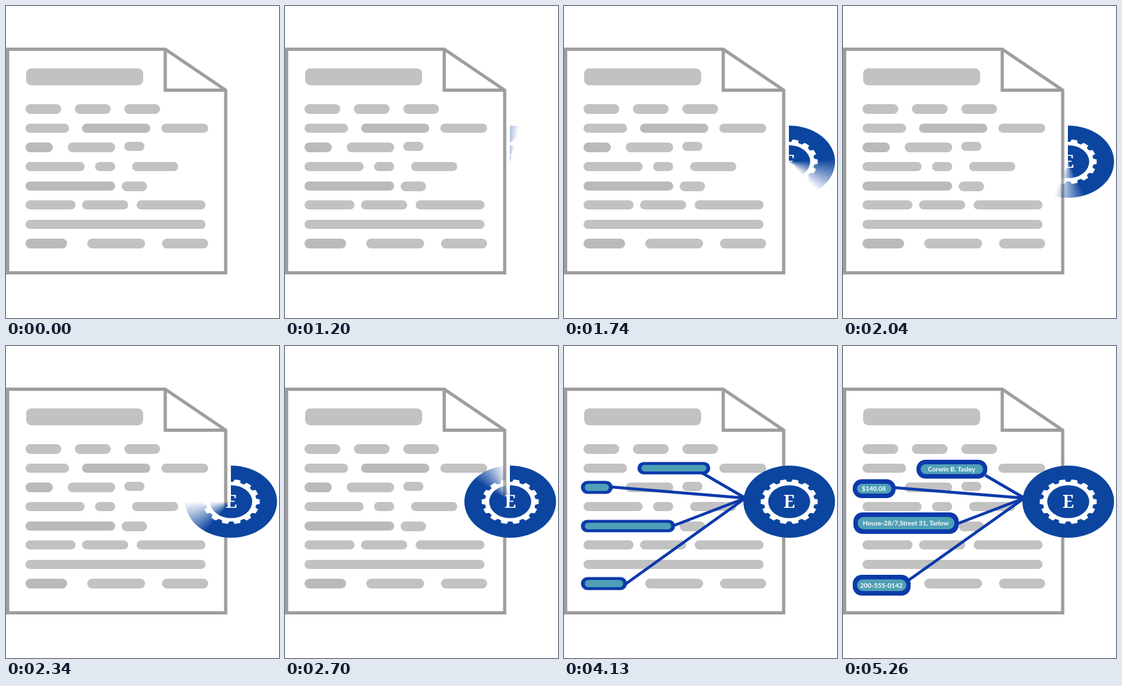
An HTML page for the animation above (6390 ms loop, 420 by 480 pixels).

```html
<!DOCTYPE html>
<html lang="en">
<head>
<meta charset="utf-8">
<title>Document data extraction</title>
<style>
  html, body { margin: 0; width: 100%; height: 100%; overflow: hidden; background: #fff; }
  svg { position: absolute; display: block; }
  #page { left: 0; top: 0; }
  #badge { left: 276px; top: 184px; }
  .outline { fill: none; stroke: #9e9e9e; stroke-width: 5; }
  .bar { fill: #c2c2c2; }
  .key { fill: #bababa; }
  .ring { fill: #0c3aab; }
  .field { fill: #4fa0b6; }
  .link { stroke: #0c3aab; stroke-width: 4.5; }
  .value { font: bold 10px Lato, sans-serif; fill: #fff; text-anchor: middle; }
  .letter { font: 600 27px "Noto Serif", serif; fill: #fff; text-anchor: middle; }
</style>
</head>
<body>
<svg id="page" width="420" height="480">
  <path class="outline" d="M2.5 66.5H245L338 129.5V410.5H2.5ZM245 66.5V129.5H338"/>
  <g id="bars"></g>
  <g id="links"></g>
  <g id="marks"></g>
  <g id="values"></g>
</svg>
<svg id="badge" width="141" height="111" viewBox="-70.5 -55.5 141 111">
  <ellipse rx="70.5" ry="55.5" fill="#0c459f"/>
  <g transform="scale(1 .785)">
    <path id="gear" fill="#fff"/>
    <circle r="32.3" fill="#0c459f"/>
  </g>
  <text class="letter" y="9.3">E</text>
</svg>
<script>
const LOOP = 6390, WIPE = 1200, STEP = 60, MARK = 3600, LINK = 4130, READ = 5260;
const HUB = [279, 234];
const $ = id => document.getElementById(id);

const pill = (cls, left, top, right, bottom, radius = (bottom - top) / 2) =>
  `<rect class="${cls}" x="${left}" y="${top}" width="${right - left}" height="${bottom - top}" rx="${radius}"/>`;
const link = (x, y) =>
  `<line class="link" x1="${HUB[0]}" y1="${HUB[1]}" x2="${x}" y2="${y}"/>`;

// Each row: top, height, then left/right pairs.
const rows = [
  [151, 15, 30, 85, 106, 161, 182, 237],
  [181, 14, 30, 97, 239, 311],
  [210, 15, 95, 168],
  [209, 14, 182, 213],
  [240, 14, 30, 121, 137, 168, 194, 265],
  [270, 15, 178, 217],
  [299, 14, 30, 107, 117, 188, 201, 307],
  [329, 14, 30, 307],
  [358, 15, 125, 214, 240, 311]
];

// bar and pill: left, top, right, bottom; ends: link end before and after reading.
const fields = [
  { bar: [117, 181, 222, 195], pill: [113, 175, 222, 204], ends: [[212, 195], [219, 199]], text: "Corwin B. Tasley" },
  { bar: [30, 210, 72, 225], pill: [15, 205, 81, 234], ends: [[74, 217], [80, 218]], text: "$140.08" },
  { bar: [30, 270, 168, 284], pill: [16, 256, 178, 289], ends: [[167, 277], [177, 273]], text: "House-28/7,Street 31, Tarlow" },
  { bar: [30, 358, 94, 373], pill: [15, 352, 104, 384], ends: [[95, 366], [100, 361]], text: "200-555-0142" }
];

function mark({ bar: [l, t, r, b] }) {
  return pill("ring", l - 4, t - 2.5, r + 3, b + 2.5) + pill("field", l + 2, t + 2, r - 3, b - 2);
}

function value({ pill: [l, t, r, b], text }) {
  return pill("ring", l, t, r, b, 14) + pill("field", l + 6.5, t + 7, r - 6.5, b - 7) +
    `<text class="value" x="${(l + r) / 2 - 0.5}" y="${(t + b) / 2 + 3.7}">${text}</text>`;
}

function gearPath(teeth) {
  const points = [];
  for (let i = 0; i < teeth; i++) {
    const middle = (i + 0.5) * 2 * Math.PI / teeth;
    for (const [offset, radius] of [[-0.15, 39], [-0.1, 44], [0.1, 44], [0.15, 39]]) {
      const a = middle + offset;
      points.push([radius * Math.sin(a), -radius * Math.cos(a)].map(v => v.toFixed(2)));
    }
  }
  return "M" + points.join("L") + "Z";
}

const links = stage => fields.map(f => link(...f.ends[stage])).join("");

$("gear").setAttribute("d", gearPath(14));
$("bars").innerHTML =
  pill("bar", 31, 96, 211, 122, 8) +
  rows.map(([top, height, ...edges]) => {
    let out = "";
    for (let i = 0; i < edges.length; i += 2) out += pill("bar", edges[i], top, edges[i + 1], top + height);
    return out;
  }).join("") +
  fields.map(f => pill("key", ...f.bar)).join("");
$("links").innerHTML = `<g id="linksEarly">${links(0)}</g><g id="linksLate">${links(1)}</g>`;
$("marks").innerHTML = fields.map(mark).join("");
$("values").innerHTML = fields.map(value).join("");

const show = (id, visible) => { $(id).style.display = visible ? "" : "none"; };

// Clockwise wipe with a soft leading edge.
function wipe(t) {
  const lead = 16 + 13.4 * Math.floor((t - WIPE) / STEP);
  const mask = lead > 410 ? "none" : `conic-gradient(#000 ${lead - 50}deg, transparent ${lead}deg)`;
  $("badge").style.maskImage = $("badge").style.webkitMaskImage = mask;
}

function draw(now) {
  const t = now % LOOP;
  show("badge", t >= WIPE);
  if (t >= WIPE) wipe(t);
  show("marks", t >= MARK && t < READ);
  show("linksEarly", t >= LINK && t < READ);
  show("linksLate", t >= READ);
  show("values", t >= READ);
}

const start = performance.now();
function tick() {
  draw(performance.now() - start);
  requestAnimationFrame(tick);
}
tick();
</script>
</body>
</html>
```
